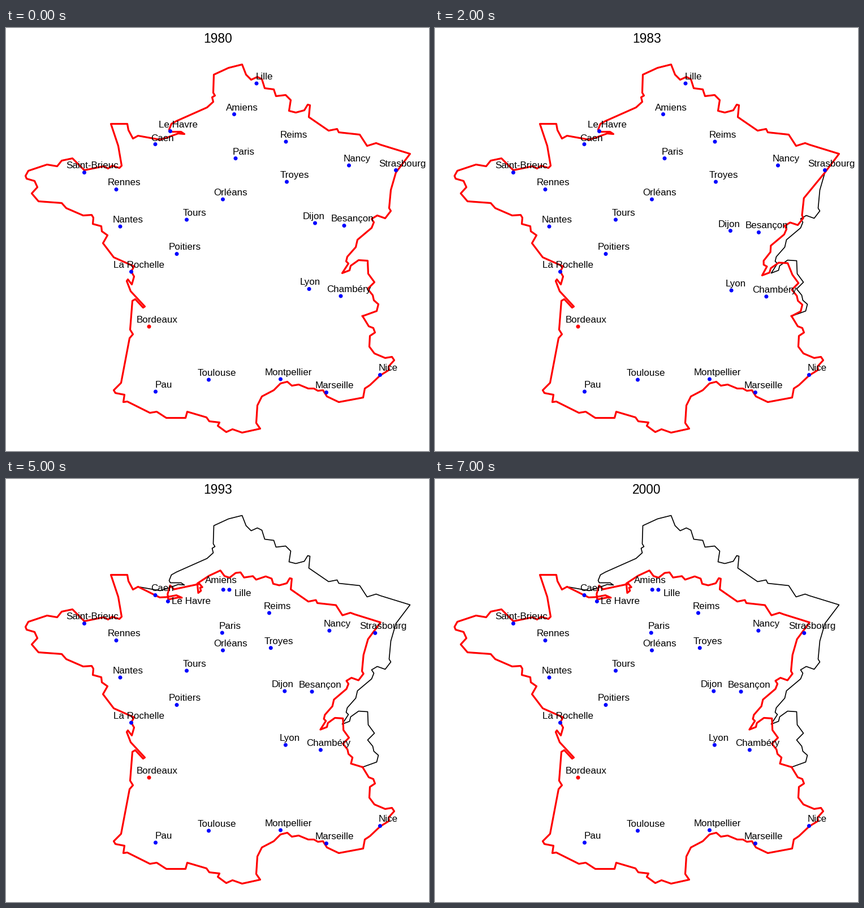
Write a matplotlib script that moves like this. It is 748 px wide and 748 px high and loops after 8 s.

```python
import matplotlib.pyplot as plt
import numpy as np
from matplotlib.animation import FuncAnimation

SIZE, DPI = 748, 100
PT = 72 / DPI  # points per pixel

plt.rcParams["font.family"] = ["Liberation Sans"]

# Coast that never moves, clockwise in stage pixels
SOUTH = [
    (630, 509), (641, 527), (649, 530), (652, 538), (643, 544), (642, 563),
    (651, 575), (670, 583), (682, 581), (686, 587), (676, 598), (677, 604),
    (661, 614), (643, 631), (634, 637), (631, 653), (588, 661), (567, 651),
    (560, 640), (551, 641), (544, 637), (534, 637), (517, 630), (505, 632),
    (497, 625), (485, 628), (473, 640), (452, 651), (444, 667), (442, 698),
    (449, 708), (417, 715), (400, 709), (389, 714), (374, 703), (377, 697),
    (359, 695), (354, 688), (320, 678), (317, 689), (283, 689), (266, 678),
    (254, 680), (214, 660), (207, 661), (209, 648), (193, 645), (190, 640),
    (203, 627),
]
WEST = [
    (218, 548), (224, 541), (219, 533), (223, 482), (228, 479), (242, 494),
    (245, 492), (220, 465), (213, 447), (215, 444), (222, 453), (226, 439),
    (221, 430), (226, 421), (190, 405), (171, 380), (179, 366), (169, 359),
    (168, 350), (153, 346), (154, 335), (151, 330), (136, 331), (106, 318),
    (98, 309), (57, 306), (45, 292), (55, 281), (50, 270), (36, 266),
    (34, 261), (39, 252), (72, 241), (90, 244), (98, 234), (117, 230),
    (138, 251), (172, 244), (180, 248), (187, 243), (200, 247), (204, 243),
    (198, 208), (185, 169), (214, 169), (216, 180), (224, 195), (233, 190),
]
# Coast and border that get pulled towards the hub
NORTH_EAST = [
    (272, 197), (285, 193), (304, 186), (315, 187), (309, 183), (290, 183),
    (288, 179), (292, 169), (301, 164), (355, 140), (366, 130), (364, 122),
    (369, 119), (366, 114), (367, 82), (393, 70), (417, 64), (424, 82),
    (433, 91), (444, 86), (452, 90), (457, 106), (473, 108), (477, 120),
    (494, 118), (503, 127), (500, 146), (512, 149), (527, 145), (533, 135),
    (537, 136), (535, 157), (570, 181), (585, 178), (588, 184), (625, 188),
    (638, 208), (654, 203), (662, 206), (714, 222), (689, 255), (680, 286),
    (677, 318), (680, 323), (670, 336), (656, 331), (646, 337), (650, 343),
    (646, 353), (621, 374), (618, 387), (603, 404), (601, 412), (605, 416),
    (594, 433), (607, 428), (609, 420), (623, 410), (639, 411), (640, 434),
    (651, 449), (639, 461), (648, 472), (650, 481), (658, 488), (655, 500),
]
CITIES = {
    "Lille": (442.5, 97.5), "Amiens": (403, 152), "Le Havre": (290, 182),
    "Caen": (263.5, 205), "Reims": (494.5, 200.5), "Paris": (405.5, 230),
    "Nancy": (606, 242.5), "Strasbourg": (689, 251), "Troyes": (496, 271.5),
    "Saint-Brieuc": (138, 255), "Rennes": (194.5, 285),
    "Orléans": (383, 302.5), "Tours": (319, 338.5), "Nantes": (201.5, 350.5),
    "Dijon": (546, 344.5), "Besançon": (597.5, 349), "Poitiers": (301.5, 399),
    "La Rochelle": (221, 430.5), "Lyon": (535.5, 461),
    "Chambéry": (591.5, 473.5), "Bordeaux": (252.5, 527.5),
    "Toulouse": (358, 621.5), "Montpellier": (485, 620.5),
    "Nice": (661, 613), "Marseille": (566, 644), "Pau": (264, 642.5),
}
HUB = "Bordeaux"

# Remaining share of the distance to the hub: {vertex of NORTH_EAST: share}
PULL_1980 = {0: 1}
PULL_1983 = {40: 1, 41: .934, 49: .925, 54: .953, 58: .959, 59: .978}
PULL_1990 = {0: .96, 5: .905, 7: .942, 9: .871, 10: .888, 14: .897, 27: .887,
             31: .9, 40: .907, 41: .853, 48: .85, 49: .833, 54: .865,
             58: .873, 60: .894}
PULL_1993 = {**PULL_1990, 10: .83, 14: .745, 20: .748, 21: .785, 24: .815,
             25: .887}

# year, coast pull, city shares, label shifts; the last two accumulate
STEPS = [
    (1980, PULL_1980, {},
     {"Dijon": (-2.5, -12), "Lyon": (2, -12), "Caen": (12.5, -10.5)}),
    (1981, PULL_1980, {}, {}),
    (1983, PULL_1983,
     {"Dijon": .918, "Besançon": .926, "Lyon": .958, "Chambéry": .982},
     {"Lyon": (8, -12)}),
    (1989, PULL_1983, {}, {}),
    (1990, PULL_1990,
     {"Lille": .888, "Amiens": .872, "Le Havre": .905, "Reims": .878,
      "Paris": .845, "Nancy": .902, "Strasbourg": .916, "Troyes": .884,
      "Dijon": .817, "Besançon": .835, "Lyon": .86, "Chambéry": .895},
     {"Le Havre": (41.5, -6), "Caen": (-.5, -12), "Dijon": (-4, -12),
      "Lyon": (6, -12)}),
    (1993, PULL_1993, {"Lille": .747, "Le Havre": .891, "Lyon": .853},
     {"Lille": (23.5, 6), "Amiens": (-4, -17), "Le Havre": (41, -.5),
      "Caen": (12.5, -12), "Lyon": (7, -12.5)}),
    (1994, PULL_1993, {}, {}),
    (2000, PULL_1993, {}, {}),
]


def pull(points, share):
    """Scale points towards the hub, slightly less in height."""
    points, hub = np.array(points, float), np.array(CITIES[HUB])
    loss = (1 - np.reshape(share, (-1, 1))) * (1, .9)
    return points - loss * (points - hub)


def outline(keys):
    share = np.interp(range(len(NORTH_EAST)), list(keys), list(keys.values()))
    moved = pull(NORTH_EAST, share)
    return np.vstack([SOUTH, WEST, moved, SOUTH[:1]]).T


fig = plt.figure(figsize=(SIZE / DPI, SIZE / DPI), dpi=DPI, facecolor="white")
ax = fig.add_axes([0, 0, 1, 1])
ax.set(xlim=(-.5, SIZE - .5), ylim=(SIZE - .5, -.5))
ax.axis("off")

join = dict(solid_joinstyle="round")
ax.plot(*outline(PULL_1980), color="black", lw=1.7 * PT, zorder=1, **join)
border, = ax.plot([], [], color="red", lw=3.2 * PT, zorder=2, **join)
colors = ["red" if name == HUB else "blue" for name in CITIES]
dots = ax.scatter(*zip(*CITIES.values()), s=(7 * PT) ** 2, c=colors,
                  linewidths=0, zorder=3)
labels = {name: ax.text(0, 0, name, size=17 * PT, ha="center",
                        va="baseline", zorder=4) for name in CITIES}
title = ax.text(374, 26, "", size=22.8 * PT, ha="center", va="baseline")


def draw(frame):
    shares, shifts = dict.fromkeys(CITIES, 1), {}
    for year, keys, pulled, nudged in STEPS[:frame + 1]:
        shares.update(pulled)
        shifts.update(nudged)
    border.set_data(*outline(keys))
    places = pull(list(CITIES.values()), list(shares.values()))
    dots.set_offsets(places)
    for (name, label), (x, y) in zip(labels.items(), places):
        dx, dy = shifts.get(name, (14, -12))
        # keep the widest label inside the right edge
        label.set_position((min(x + dx, 700.5), y + dy + 5))
    title.set_text(str(year))
    return [border, dots, title, *labels.values()]


anim = FuncAnimation(fig, draw, frames=len(STEPS), interval=1000, repeat=True,
                     repeat_delay=0)
plt.show()
```
